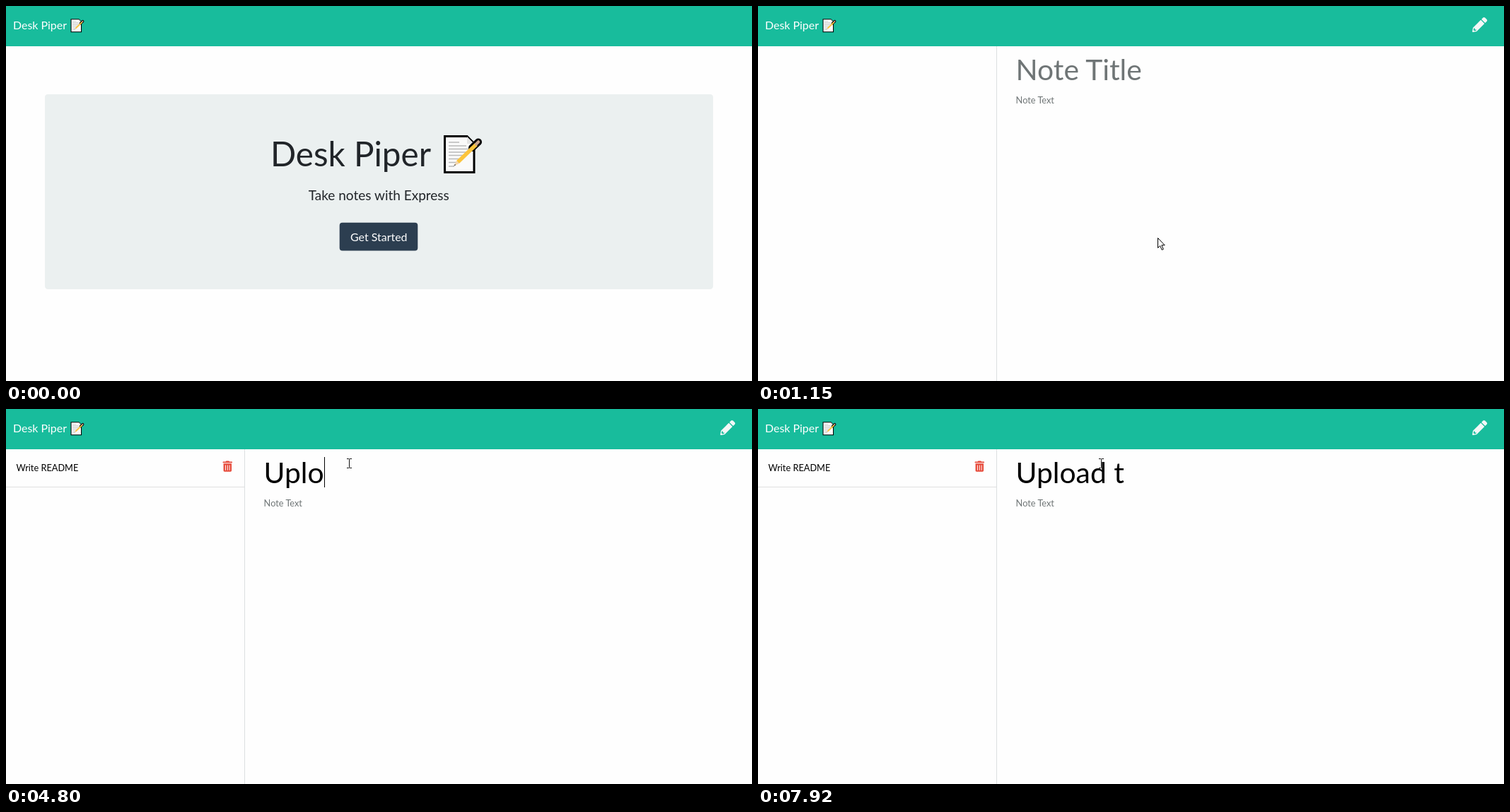
An HTML page for the animation above (8 s loop, 1055 by 531 pixels).

```html
<!DOCTYPE html>
<html lang="en">
<head>
<meta charset="utf-8">
<title>Desk Piper</title>
<style>
  html, body { margin: 0; width: 100%; height: 100%; overflow: hidden; background: #fefefe; }
  svg { display: block; }
  text { font-family: Lato, sans-serif; white-space: pre; fill: #212529; }
  .brand, .btn { font-size: 15.94px; fill: #fff; }
  .h1 { font-size: 47.6px; }
  .h4 { font-size: 19px; }
  .title { font-size: 40.8px; }
  .body { font-size: 12.75px; }
  .hint { fill: #6f7576; }
  .ink { fill: #000; }
</style>
</head>
<body>
<svg width="1055" height="531" viewBox="0 0 1055 531">
  <defs>
    <g id="memo">
      <path d="M1.5 1.5H33L43 11.500V52.500H1.500Z" fill="#fafafa" stroke="#000" stroke-width="3"/>
      <path d="M33 2V12H43" fill="#e4e4e4"/>
      <path d="M7 10H22M7 15H32M7 19.500H36M7 24H34M7 28.500H30M7 33.500H26M7 38.500H21M7 44H15" stroke="#b9b9b9" stroke-width="1.600"/>
      <path d="M40 18L49 9.500" stroke="#000" stroke-width="10" stroke-linecap="round"/>
      <path d="M20 38L46 13" stroke="#fcc43c" stroke-width="5.500"/>
      <path d="M46 12.500L49 9.500" stroke="#c9a58c" stroke-width="4.500" stroke-linecap="round"/>
      <path d="M18 36L22 40L14.500 43.500Z" fill="#f3d6ae"/>
      <path d="M16 40.800L17.200 42.200L14 43.800Z" fill="#555"/>
    </g>
  </defs>

  <rect width="1055" height="57" fill="#18bc9c"/>
  <text class="brand" x="10" y="33">Desk Piper</text>
  <use href="#memo" transform="translate(91.500 18.300) scale(.35)"/>

  <g id="home">
    <rect x="55" y="125" width="945" height="276" rx="4.200" fill="#ebf0f0"/>
    <text class="h1" x="374" y="227">Desk Piper</text>
    <use href="#memo" x="619" y="183"/>
    <text class="h4" x="527.300" y="275" text-anchor="middle">Take notes with Express</text>
    <rect id="ring" x="469.500" y="304.500" width="115" height="44" rx="6" fill="#8b98a4"/>
    <rect id="button" x="471.700" y="306.700" width="110.600" height="39.700" rx="4" fill="#2c3e50"/>
    <text class="btn" x="527.300" y="332.500" text-anchor="middle">Get Started</text>
  </g>

  <g id="notes">
    <path d="M337.500 57V531" stroke="#dcdfe1"/>
    <g transform="translate(1010.200 16) scale(.041)" fill="#f3f7f7">
      <path d="M498 142l-46 46c-5 5-12 5-17 0L324 77c-5-5-5-12 0-17l46-46c19-19 49-19 68 0l60 60c19 19 19 49 0 68z"/>
      <path d="M284 100L22 362 0 484c-3 16 11 31 28 28l122-22 262-262c5-5 5-12 0-17L301 100c-5-5-12-5-17 0zM88 424h48v36l-64 12-32-32 12-64h36z" fill-rule="evenodd"/>
    </g>
    <g id="item">
      <text class="body ink" x="14.500" y="88">Write README</text>
      <path d="M0 110.500H337" stroke="#dfdfdf"/>
      <path transform="translate(306.600 73.500) scale(.0299)" fill="#e74c3c" fill-rule="evenodd"
        d="M32 464a48 48 0 0 0 48 48h288a48 48 0 0 0 48-48V128H32zM304 208a16 16 0 0 1 32 0v224a16 16 0 0 1-32 0zM208 208a16 16 0 0 1 32 0v224a16 16 0 0 1-32 0zM112 208a16 16 0 0 1 32 0v224a16 16 0 0 1-32 0zM432 32H312l-9-19A24 24 0 0 0 281 0H167a24 24 0 0 0-22 13L136 32H16A16 16 0 0 0 0 48v32a16 16 0 0 0 16 16h416a16 16 0 0 0 16-16V48a16 16 0 0 0-16-16z"/>
    </g>
    <text id="hint" class="title hint" x="364.600" y="105">Note Title</text>
    <text id="typed" class="title ink" x="364.600" y="105"></text>
    <rect id="caret" y="68" width="1" height="43"/>
    <text class="body hint" x="364.600" y="137.500">Note Text</text>
  </g>

  <g id="cursor">
    <path id="arrow" d="M.500 .500V14.500L3.700 11.500L6.200 17.300L8.300 16.400L5.900 10.700H10.200Z" fill="#fff" stroke="#000"/>
    <path id="hand" d="M.500 1.500Q1.500-.500 2.800 1.500V6Q4.500 5 5.300 6.500Q7 5.600 7.800 7.200Q9.800 6.800 10 8.800V12.500L8.600 15V17H2.600V15.500L-2.200 10.500Q-2.600 8.500-.800 8.800L.500 10Z" fill="#fff" stroke="#222" stroke-width=".8"/>
    <path id="beam" d="M-3.500-6.500H-1Q0-6.500 0-5.500Q0-6.500 1-6.500H3.500M0-5.500V5.500M-3.500 6.500H-1Q0 6.500 0 5.500Q0 6.500 1 6.500H3.500" fill="none" stroke="#111"/>
  </g>
</svg>
<script>
const LOOP = 8000, PHRASE = 'Upload thi', LEFT = 364.6;
// [time, letters shown]
const TYPING = [[4260, 1], [4570, 2], [4650, 3], [4800, 4], [4880, 5], [5030, 6],
  [6040, 7], [6820, 8], [6900, 9], [7050, 10], [7750, 9], [7920, 8]];
// times at which the caret turns on or off
const BLINKS = [2000, 2550, 3100, 3650, 4110, 5580, 6040, 6590, 6820, 7600];

const $ = id => document.getElementById(id);
const show = (id, on) => $(id).setAttribute('visibility', on ? 'inherit' : 'hidden');
const clamp = v => Math.max(0, Math.min(1, v));
const mix = (a, b, p) => a + (b - a) * p;
const easeOut = p => 1 - (1 - p) ** 2;
const easeInOut = p => p * p * (3 - 2 * p);

// progress in held steps, as a screen recorder samples it
const stepped = (t, start, gap, count) => clamp((Math.floor((t - start) / gap) + 1) / count);

function pointer(t) {
  if (t < 1230) {
    const p = easeOut(stepped(t, 210, 79, 10));
    return [Math.round(mix(1055, 565, p)), Math.round(mix(545, 328, p))];
  }
  if (t < 1300) return [570, 312];
  const p = easeInOut(stepped(t, 1620, 76, 6));
  return [Math.round(mix(570, 485, p)) + .5, Math.round(mix(295, 77, p))];
}

function draw(t) {
  const home = t < 1150;
  show('home', home);
  show('notes', !home);

  const [x, y] = pointer(t);
  const over = home && x > 472 && x < 582 && y > 307 && y < 346;
  const kind = over ? 'hand' : t < 1230 ? 'arrow' : 'beam';
  show('cursor', t >= 210);
  $('cursor').setAttribute('transform', `translate(${x} ${y})`);
  for (const id of ['arrow', 'hand', 'beam']) show(id, id === kind);

  $('button').setAttribute('fill', over ? '#1e2b37' : '#2c3e50');
  $('ring').setAttribute('opacity', t < 1000 ? 0 : t < 1070 ? .5 : 1);

  show('item', t >= 1230);
  const count = TYPING.reduce((n, [at, len]) => t >= at ? len : n, 0);
  const typed = $('typed');
  typed.textContent = PHRASE.slice(0, count);
  show('hint', !count);
  show('caret', BLINKS.filter(at => t >= at).length % 2 === 1);
  $('caret').setAttribute('x', Math.round(LEFT + (count ? typed.getComputedTextLength() : 0)));
}

const begin = performance.now();
function tick() {
  draw((performance.now() - begin) % LOOP);
  requestAnimationFrame(tick);
}
tick();
</script>
</body>
</html>
```
